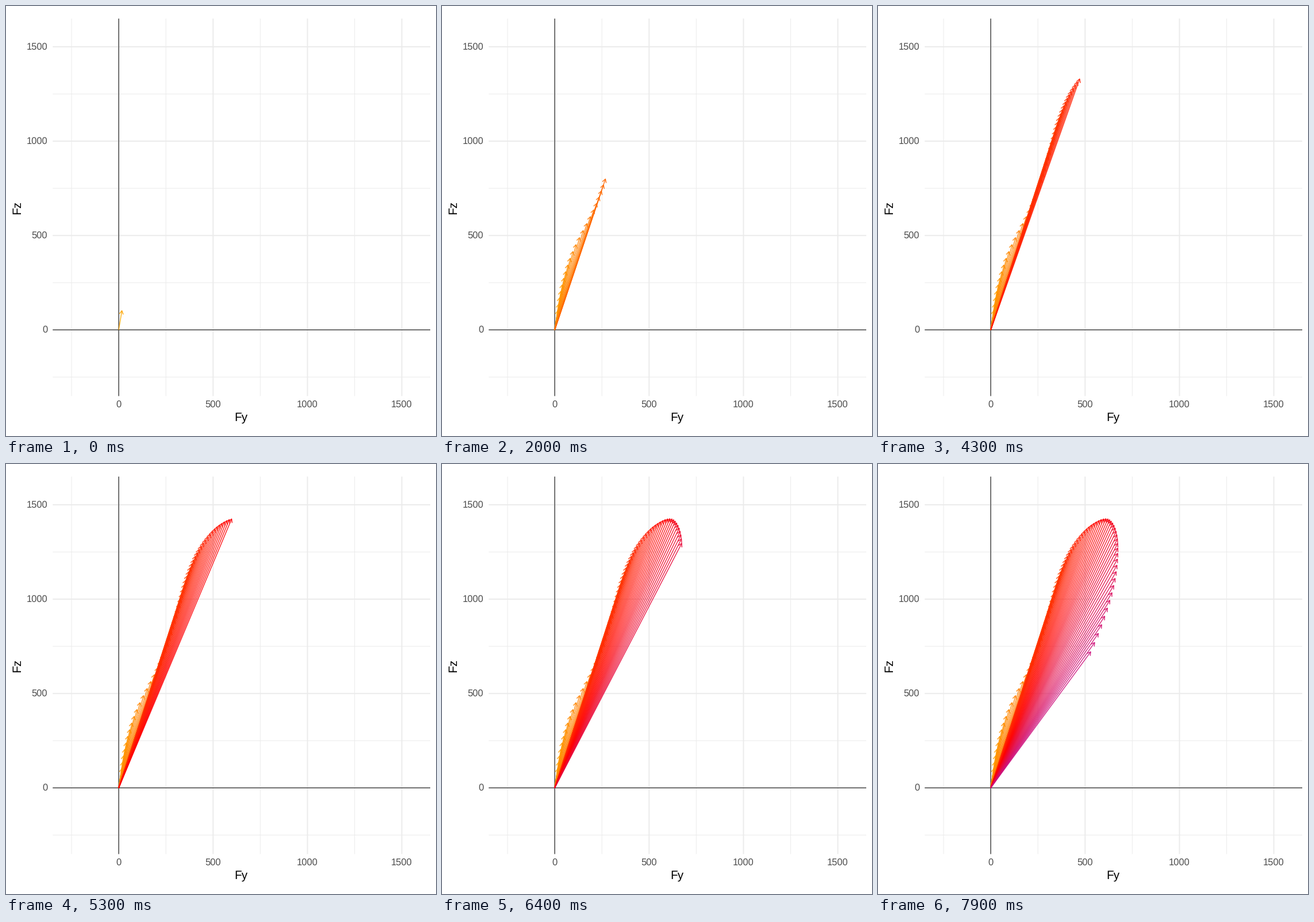
Animation, 748 px wide and 748 px high, one loop 8 s. Source, as a matplotlib script:

```python
import numpy as np
import matplotlib.pyplot as plt
from matplotlib.animation import FuncAnimation
from matplotlib.collections import LineCollection
from matplotlib.colors import LinearSegmentedColormap

SIZE, DPI = 748, 88
PX = 72 / DPI                        # one pixel in points
FRAMES, INTERVAL = 80, 100
X0, Y0, UNIT = 196.1, 563.4, 0.3283  # data origin and pixels per unit
LEFT, RIGHT, TOP, BOTTOM = 81.3, 738, 21.9, 678.5
HEAD, HEAD_ANGLE = 7.0, np.radians(30)

# Key points of the arrow tip (x + yj in pixels), evenly spaced in time
KEY_STEP = 8
KEYS = np.array([201.6 + 530j, 223 + 439j, 269 + 343.5j, 296.2 + 262j,
                 315.3 + 194.8j, 339.2 + 143j, 371.5 + 106.2j, 403 + 97j,
                 417 + 138j, 407 + 224j, 362.5 + 343.5j])
SLOPES = np.gradient(KEYS, edge_order=2)

RAMP = LinearSegmentedColormap.from_list("ramp", ["#ffa500", "#ff0000", "#a020f0"])
RAMP_STEPS = 104

plt.rcParams["font.family"] = "Liberation Sans"
plt.rcParams["text.hinting"] = "none"


def tip(step):
    """Cubic Hermite curve through the key points."""
    i, s = divmod(step / KEY_STEP, 1)
    i = int(i)
    return ((1 + 2 * s) * (1 - s) ** 2 * KEYS[i]
            + s * (1 - s) ** 2 * SLOPES[i]
            + s * s * (3 - 2 * s) * KEYS[i + 1]
            + s * s * (s - 1) * SLOPES[i + 1])


def arrow(step):
    """Shaft and open head of one arrow from the origin."""
    start, end = X0 + 1j * Y0, tip(step)
    back = HEAD * (start - end) / abs(start - end)
    wings = [end + back * np.exp(1j * a) for a in (HEAD_ANGLE, -HEAD_ANGLE)]
    paths = [start, end], [wings[0], end, wings[1]]
    return [[(p.real, p.imag) for p in path] for path in paths]


fig = plt.figure(figsize=(SIZE / DPI, SIZE / DPI), dpi=DPI, facecolor="white")
ax = fig.add_axes([0, 0, 1, 1])
ax.set_xlim(0, SIZE)
ax.set_ylim(SIZE, 0)
ax.axis("off")


def line(xs, ys, color, width, z):
    ax.plot(xs, ys, color=color, lw=width * PX, zorder=z, snap=False,
            solid_capstyle="butt")


def cross(value, color, width, z):
    """Vertical and horizontal panel lines at a data value."""
    x, y = X0 + value * UNIT, Y0 - value * UNIT
    line([x, x], [TOP, BOTTOM], color, width, z)
    line([LEFT, RIGHT], [y, y], color, width, z)


def label(x, y, text, size, color, ha="center", rotation=0):
    ax.text(x, y, text, fontsize=size * PX, color=color, ha=ha,
            va="baseline", rotation=rotation, rotation_mode="anchor")


for v in range(-250, 1500, 500):
    cross(v, "#ebebeb", 0.97, 1)
for v in range(0, 1501, 500):
    cross(v, "#ebebeb", 1.94, 2)
    label(X0 + v * UNIT, 698.8, str(v), 16.5, "#4d4d4d")
    label(72.2, Y0 - v * UNIT + 5.6, str(v), 16.5, "#4d4d4d", ha="right")
cross(0, "#333333", 1.3, 3)
label(409.3, 722, "Fy", 20.8, "black")
label(25.2, 350, "Fz", 20.8, "black", rotation=90)

segments = [part for s in range(FRAMES) for part in arrow(s)]
colors = [RAMP(s / RAMP_STEPS, alpha=0.85) for s in range(FRAMES) for _ in range(2)]

arrows = LineCollection([], linewidths=1.5 * PX, zorder=4, snap=False,
                        capstyle="butt", joinstyle="round")
ax.add_collection(arrows, autolim=False)


def draw(step):
    n = 2 * (step + 1)
    arrows.set_segments(segments[:n])
    arrows.set_color(colors[:n])
    return [arrows]


anim = FuncAnimation(fig, draw, frames=FRAMES, interval=INTERVAL,
                     repeat=True, repeat_delay=0, blit=False)
plt.show()
```
